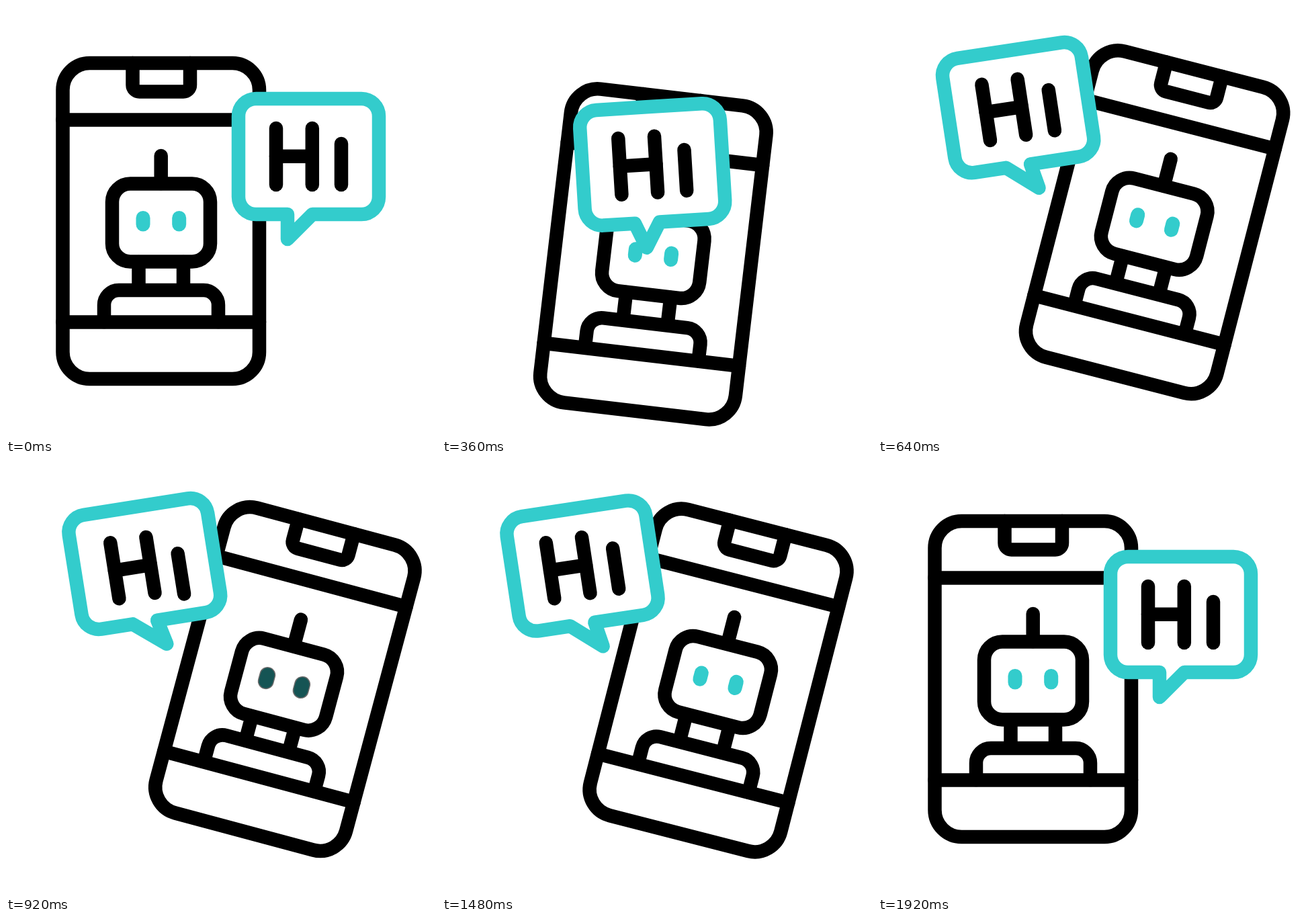
Recreate the animation shown at these times as an HTML page with a canvas. Size 640x640 px, loop 2 s.

```html
<!DOCTYPE html>
<html lang="en">
<head>
<meta charset="utf-8">
<title>Chat robot</title>
<style>
  html, body { margin: 0; width: 100%; height: 100%; overflow: hidden; background: #fff; }
  canvas { display: block; width: 640px; height: 640px; }
</style>
</head>
<body>
<canvas id="stage" width="640" height="640"></canvas>
<script>
const ctx = document.getElementById('stage').getContext('2d');
const LOOP = 2000, STEP = 40;
const TEAL = '#33cccc', BLACK = '#000';

// Smooth curve through the points (xs, ys), with parabolic tangents.
function spline(xs, ys, x) {
  const n = xs.length - 1;
  if (x <= xs[0]) return ys[0];
  if (x >= xs[n]) return ys[n];
  const width = i => xs[i + 1] - xs[i];
  const slope = i => (ys[i + 1] - ys[i]) / width(i);
  const tangent = i => {
    if (i === 0) return 2 * slope(0) - tangent(1);
    if (i === n) return 2 * slope(n - 1) - tangent(n - 1);
    const a = width(i - 1), b = width(i);
    return (slope(i - 1) * b + slope(i) * a) / (a + b);
  };
  let i = 0;
  while (x > xs[i + 1]) i++;
  const h = width(i), u = (x - xs[i]) / h, v = 1 - u;
  return ys[i] * v * v * (1 + 2 * u) + ys[i + 1] * u * u * (3 - 2 * u)
    + h * u * v * (tangent(i) * v - tangent(i + 1) * u);
}

// Swing progress over time: 0 upright, 1 tilted to the right.
const swing = {
  time: [120, 240, 480, 640, 680, 720, 1360, 1400, 1480, 1680, 1800, 1920],
  value: [0, 0.175, 0.725, 0.97, 1, 1, 1, 1, 0.966, 0.5, 0.295, 0]
};

// Poses along the swing.
const along = [0, 0.175, 0.5, 0.725, 0.966, 1];
const pose = {
  phoneX: [230.7, 262, 324.3, 365, 411, 415.3],
  phoneY: [320, 347.5, 369.5, 353.5, 322, 320],
  phoneTurn: [0, 2.85, 7.46, 10.8, 14.4, 15],
  bubbleX: [450.5, 420.3, 295.5, 246, 209, 206.3],
  bubbleY: [224, 238.3, 231, 192.5, 151.5, 148.5],
  bubbleTurn: [0, -1.45, -4, -6.5, -8.6, -9],
  tip: [-31.5, -26.3, -13.3, 2.1, 12.4, 14]
};

// Fraction of a time window, resting at 0 outside of it.
function phase(t, start, length) {
  const u = (t - start) / length;
  return u > 0 && u < 1 ? u : 0;
}

function stroke(color, build, width = 20.5) {
  ctx.beginPath();
  build();
  ctx.strokeStyle = color;
  ctx.lineWidth = width;
  ctx.stroke();
}

function line(color, x1, y1, x2, y2, width) {
  stroke(color, () => { ctx.moveTo(x1, y1); ctx.lineTo(x2, y2); }, width);
}

function box(color, x, y, w, h, r) {
  stroke(color, () => {
    ctx.moveTo(x + r, y);
    ctx.arcTo(x + w, y, x + w, y + h, r);
    ctx.arcTo(x + w, y + h, x, y + h, r);
    ctx.arcTo(x, y + h, x, y, r);
    ctx.arcTo(x, y, x + w, y, r);
    ctx.closePath();
  });
}

function at(x, y, degrees, draw) {
  ctx.save();
  ctx.translate(x, y);
  ctx.rotate(degrees * Math.PI / 180);
  draw();
  ctx.restore();
}

function drawPhone(bob) {
  ctx.translate(-230.7, -320);
  box(BLACK, 84.5, 85, 292.5, 470, 40);
  stroke(BLACK, () => {
    ctx.moveTo(188.5, 85);
    ctx.arcTo(188.5, 127.5, 231, 127.5, 10);
    ctx.arcTo(274, 127.5, 274, 85, 10);
    ctx.lineTo(274, 85);
  });
  line(BLACK, 84.5, 169.5, 377, 169.5);
  line(BLACK, 84.5, 470.5, 377, 470.5);

  const sink = bob;
  stroke(BLACK, () => {
    ctx.moveTo(146, 470);
    ctx.arcTo(146, 423 + sink, 230, 423 + sink, 22);
    ctx.arcTo(316, 423 + sink, 316, 470, 22);
    ctx.lineTo(316, 470);
  });

  ctx.translate(0, 5.6 * bob);
  line(BLACK, 197.5, 381, 197.5, 417);
  line(BLACK, 264, 381, 264, 417);
  line(BLACK, 230.7, 223, 230.7, 264);
  box(BLACK, 158, 264.5, 146, 116, 27);
  for (const x of [204, 257.7]) {
    line(TEAL, x, 315.5, x, 325, 21);
    if (bob > 0) {
      ctx.globalAlpha = 0.6 * bob;
      line(BLACK, x, 315.5, x, 325, 24);
      ctx.globalAlpha = 1;
    }
  }
}

function letter(u, draw) {
  ctx.save();
  ctx.translate(3 * Math.sin(Math.PI * u), 13.5 * Math.sin(2 * Math.PI * u));
  draw();
  ctx.restore();
}

function drawBubble(tip, t) {
  const w = 104.5, h = 86, r = 26;
  stroke(TEAL, () => {
    ctx.moveTo(0, -h);
    ctx.arcTo(w, -h, w, h, r);
    ctx.arcTo(w, h, 0, h, r);
    ctx.lineTo(5.5, h);
    ctx.lineTo(tip, 123);
    ctx.lineTo(-31.5, h);
    ctx.arcTo(-w, h, -w, -h, r);
    ctx.arcTo(-w, -h, 0, -h, r);
    ctx.closePath();
    ctx.fillStyle = '#fff';
    ctx.fill();
  });
  letter(phase(t, 680, 520), () => {
    line(BLACK, -48.5, -42, -48.5, 42);
    line(BLACK, 5.3, -42, 5.3, 42);
    line(BLACK, -48.5, -0.3, 5.3, -0.3);
  });
  letter(phase(t, 746, 520), () => line(BLACK, 48.5, -19, 48.5, 42));
}

function render(t) {
  const p = spline(swing.time, swing.value, t);
  const now = {};
  for (const name in pose) now[name] = spline(along, pose[name], p);
  const bob = Math.sin(Math.PI * phase(t, 680, 560));

  ctx.fillStyle = '#fff';
  ctx.fillRect(0, 0, 640, 640);
  ctx.lineCap = ctx.lineJoin = 'round';
  at(now.phoneX, now.phoneY, now.phoneTurn, () => drawPhone(bob));
  at(now.bubbleX, now.bubbleY, now.bubbleTurn, () => drawBubble(now.tip, t));
}

const begin = performance.now();
function tick() {
  const t = (performance.now() - begin) % LOOP;
  render(Math.floor(t / STEP) * STEP);
  requestAnimationFrame(tick);
}
tick();
</script>
</body>
</html>
```
